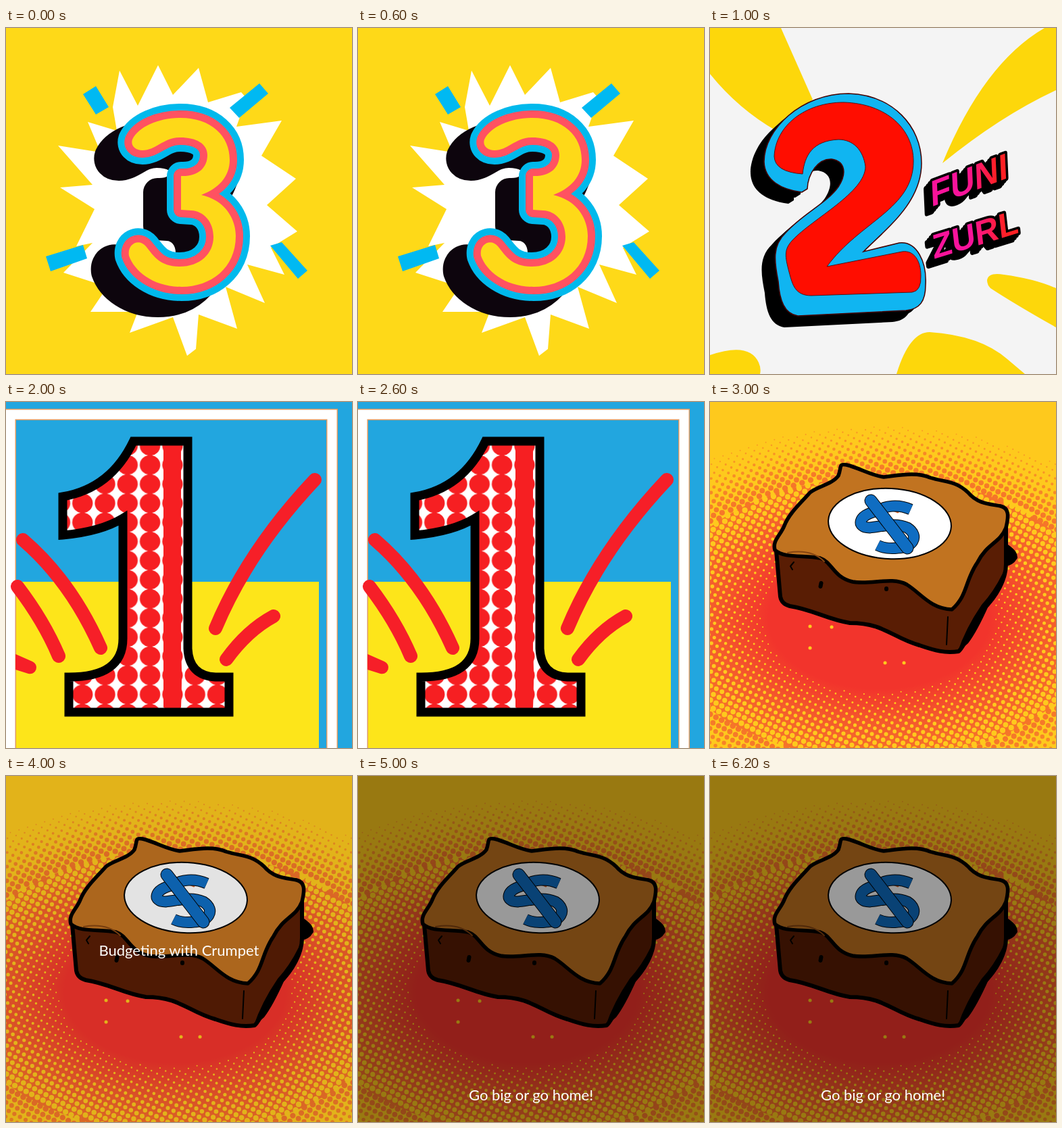
Write an HTML page that moves like this. It is 512 px wide and 512 px high and loops after 7 s.

```html
<!DOCTYPE html>
<html lang="en">
<head>
<meta charset="utf-8">
<title>Countdown</title>
<style>
  html, body { margin: 0; width: 100%; height: 100%; overflow: hidden; }
  svg { display: block; width: 100vw; height: 100vh; }
  .scene { visibility: hidden; }
  .scene.on { visibility: visible; }
  .word { font: 700 49px "Liberation Sans", sans-serif; }
  #caption { font: 400 22px Lato, sans-serif; fill: #fff; text-anchor: middle; }
  .ink { stroke: #000; stroke-linejoin: round; stroke-linecap: round; }
  .line { fill: none; stroke-linecap: round; stroke-linejoin: round; }
</style>
</head>
<body>
<svg viewBox="0 0 512 512">
  <defs>
    <path id="three" d="M187 165C196 146 226 133 258 133C304 133 331 160 331 195C331 220 315 237 289 247
      C324 255 340 282 340 308C340 355 303 383 260 383C218 383 190 360 182 337C179 319 197 311 207 323
      C219 338 228 353 257 353C287 353 307 334 307 309C307 287 293 271 274 270L259 269V219
      C284 220 298 207 298 188C298 171 281 162 258 162C233 162 222 181 202 181C191 181 184 174 187 165Z"/>
    <path id="two" d="M80 198C80 150 135 97 205 97C270 99 313 145 313 200C313 258 262 296 227 331L280 318
      C306 315 321 346 319 380C319 405 310 416 290 418L130 426C110 423 103 403 101 375
      C95 345 92 322 112 303C138 274 172 260 190 235C203 215 200 197 180 194C160 193 145 215 144 238
      L136 243C106 239 81 226 80 198Z"/>
    <g id="words" class="word">
      <text transform="matrix(1 -.38 .05 1.1 327 265)">FUNI</text>
      <text transform="matrix(.97 -.3 .12 1.02 331 342)">ZURL</text>
    </g>
    <linearGradient id="pinkRed">
      <stop offset=".45" stop-color="#f8139b"/><stop offset=".85" stop-color="#ff2024"/>
    </linearGradient>
    <pattern id="dots" width="33.3" height="28.3" x="196.5" y="79" patternUnits="userSpaceOnUse">
      <path fill="#fff" d="M0 0H34V29H0Z"/>
      <ellipse cx="16.6" cy="14.1" rx="15.2" ry="14.400" fill="#f61f22"/>
    </pattern>
    <radialGradient id="heat" gradientUnits="userSpaceOnUse" cx="0" cy="0" r="430"
      gradientTransform="translate(250 320) scale(1 .64)">
      <stop offset=".38" stop-color="#f2342c"/><stop offset=".56" stop-color="#f4592c"/>
      <stop offset=".8" stop-color="#f67a29"/><stop offset="1" stop-color="#f99a24"/>
    </radialGradient>
  </defs>

  <g class="scene">
    <path fill="#fed918" d="M0 0H512V512H0Z"/>
    <path fill="#fff" d="M168 63L195 115L225 55L247 99L285 59L299 110L348 95L356 104L341 146L408 137L378 189
      L429 223L386 262L431 301L392 325L412 365L357 350L383 407L325 383L342 445L285 424L281 475L268 485
      L247 428L183 451L195 420L125 420L150 383L85 362L128 318L104 323L131 268L80 236L128 232L77 174
      L140 184L121 139L164 152L158 117Z"/>
    <path fill="#00b9f2" d="M114 98L133 86L152 117L133 128ZM331 118L375 82L388 97L345 133Z
      M59 338L114 321L120 341L66 360ZM391 322L408 317L446 359L432 371Z"/>
    <g stroke-linejoin="round">
      <use href="#three" x="-35" y="24" fill="#0d050d" stroke="#0d050d" stroke-width="42"/>
      <path fill="#0d050d" d="M349 208L322 247L332 252Q341 238 349 208Z"/>
      <use href="#three" fill="none" stroke="#00b9ec" stroke-width="42"/>
      <use href="#three" fill="#fed918" stroke="#ff5261" stroke-width="22"/>
      <use href="#three" fill="#fed918"/>
    </g>
  </g>

  <g class="scene">
    <path fill="#f4f4f4" d="M0 0H512V512H0Z"/>
    <path fill="#fdd70b" d="M0 0H105L152 106L98 152Q42 120 0 68Z
      M344 200Q405 52 495 0H512V92Q430 130 344 200Z
      M410 373Q412 361 435 365Q480 371 512 385V443Q450 408 415 385Q410 380 410 373Z
      M276 512Q295 450 325 450Q400 455 440 490L466 512Z
      M0 484Q58 464 72 495Q76 504 74 512H0Z"/>
    <use href="#two" x="-20" y="17"/>
    <use href="#two" x="-10" y="8"/>
    <use href="#two" fill="#10b5f1" stroke="#400" stroke-width="1.5"/>
    <path fill="#ff0d00" stroke="#511" d="M137 216Q96 213 95 190C97 145 140 110 198 110C262 112 301 150 301 197
      C301 268 222 286 173 353L284 331C302 328 312 345 312 366Q313 389 299 391L150 396
      C126 396 122 380 117 361C111 338 109 328 122 314C152 282 230 243 230 205
      C227 181 212 165 190 165C152 167 140 188 137 216Z"/>
    <g id="wordShadow" stroke="#000" stroke-width="7" stroke-linejoin="round"></g>
    <use href="#words" fill="url(#pinkRed)"/>
  </g>

  <g class="scene">
    <path fill="#22a6df" d="M0 0H512V512H0Z"/>
    <path fill="#fde51a" d="M14 266H463V512H14Z"/>
    <path fill="none" stroke="#dd9a62" stroke-width="17" d="M6.500 530V18.500M-5 18.500H482.500V530"/>
    <path fill="none" stroke="#fff" stroke-width="14" d="M6.500 530V18.500M-5 18.500H482.500V530"/>
    <path fill="url(#dots)" stroke="#000" stroke-width="13" d="M188.500 58H269V365Q271 405 310 407H330V459H93V407
      Q173 407 173 350V172Q140 192 84 197V140Q155 128 188.500 58Z"/>
    <path fill="#f61f22" d="M233 65H259V370Q261 400 259 452H233Z"/>
    <g class="line" stroke="#f61f28" stroke-width="20">
      <path d="M25 204Q96 265 140 364M17 273Q56 324 78 376M457 115Q358 220 310 335M396 317Q357 338 326 381"/>
    </g>
    <path fill="#f61f28" d="M14 373L39 384A9.500 9.500 0 0 1 33 402L14 396Z"/>
  </g>

  <g class="scene">
    <path fill="#fec91d" d="M0 0H512V512H0Z"/>
    <ellipse cx="250" cy="320" rx="327" ry="209" fill="url(#heat)"/>
    <path id="inkDots" fill="url(#heat)"/>
    <path id="holes" fill="#fec91d"/>
    <path class="line" stroke="#fec91d" stroke-width="5" d="M148 332h.1M180 333h.1M148 364h.1M259 386h.1M287 386h.1"/>
    <g class="ink" stroke-width="6">
      <path d="M440 214Q452 222 452 230Q446 240 436 240Z"/>
      <path fill="#591d04" d="M98 220L104 288Q106 299 118 302C152 307 174 322 207 327C258 327 270 349 310 360
        C333 368 348 372 368 369C382 355 388 325 404 307C424 288 438 262 438 240V182L360 250L200 225Z"/>
      <path stroke="none" d="M366 371Q378 335 402 300Q425 275 440 238Q438 275 412 302Q395 340 382 357Z"/>
      <path fill="#c17320" stroke-width="5.500" d="M96 219C92 205 104 198 110 183C117 165 132 152 148 134
        C158 125 181 122 190 109C195 96 190 91 202 93C222 98 237 108 257 111C282 108 306 103 326 112
        C348 119 363 116 382 134C396 151 415 151 430 154C443 157 442 169 438 186C429 209 410 209 396 237
        C377 264 382 286 358 307C326 306 311 282 291 270C269 258 237 271 211 266C182 259 181 237 163 231
        C140 226 110 232 96 219Z"/>
    </g>
    <path class="line" stroke="#854411" stroke-width="2" d="M115 223Q150 217 169 236"/>
    <path class="line" stroke="#000" stroke-width="2" d="M352 318L350 359M124 237L119 243L122 248"/>
    <path class="line" stroke="#000" stroke-width="6" d="M164.500 268L163.500 273M261 276V277"/>
    <ellipse cx="266" cy="180" rx="91" ry="52" transform="rotate(3 266 180)" fill="#fff" stroke="#000" stroke-width="2"/>
    <path class="line" stroke="#d96a34" stroke-width="3" d="M263 161Q270 158 278 163"/>
    <g id="dollar"></g>
    <path id="shade" d="M0 0H512V512H0Z"/>
    <text id="caption" x="256"></text>
  </g>
</svg>
<script>
const byId = id => document.getElementById(id);
const scenes = [...document.querySelectorAll('.scene')];

// Words get a black extrusion towards the lower left.
byId('wordShadow').innerHTML = [0, 3, 6, 9]
  .map(k => `<use href="#words" x="${-k}" y="${k * 1.2}"/>`).join('');

const S_CURVE = 'M297 159C279 151 259 153 246 162C219 167 216 186 236 186C256 184 274 178 292 186C312 199 298 216 278 216Q260 218 248 212';
const BAR = 'M238 146L292 216';
const stroke = (d, color, width, cap) =>
  `<path d="${d}" fill="none" stroke="${color}" stroke-width="${width}" stroke-linecap="${cap}"/>`;
byId('dollar').innerHTML =
  stroke(S_CURVE, '#000', 17, 'butt') + stroke(S_CURVE, '#0f6dc2', 15, 'butt') +
  stroke(BAR, '#000', 19, 'round') + stroke(BAR, '#0f6dc2', 17, 'round');

// Halftone: ink dots grow inwards, then yellow holes shrink to solid red.
function halftone() {
  const step = 9.4, angle = 0.48, cos = Math.cos(angle), sin = Math.sin(angle);
  const disc = (x, y, r) =>
    `M${(x - r).toFixed(1)} ${y.toFixed(1)}a${r} ${r} 0 1 0 ${2 * r} 0a${r} ${r} 0 1 0 ${-2 * r} 0`;
  let ink = '', holes = '';
  for (let i = -45; i <= 45; i++) for (let j = -45; j <= 45; j++) {
    const x = 256 + step * (i * cos - j * sin), y = 256 + step * (i * sin + j * cos);
    if (x < -6 || x > 518 || y < -6 || y > 518) continue;
    const d = Math.hypot((x - 250) / 430, (y - 320) / 275);
    if (d > 0.76 && d < 1.03) ink += disc(x, y, +(0.9 + (1.03 - d) * 13).toFixed(2));
    else if (d > 0.4 && d <= 0.76) holes += disc(x, y, +(1 + (d - 0.4) * 9).toFixed(2));
  }
  byId('inkDots').setAttribute('d', ink);
  byId('holes').setAttribute('d', holes);
}
halftone();

const captions = [
  { shade: 0, text: '', y: 0 },
  { shade: 0.11, text: 'Budgeting with Crumpet', y: 266 },
  { shade: 0.4, text: 'Go big or go home!', y: 480 }
];
let shown = -1;

function draw() {
  const step = Math.min(5, Math.floor(performance.now() % 7000 / 1000));
  if (step !== shown) {
    shown = step;
    scenes.forEach((scene, i) => scene.classList.toggle('on', i === Math.min(step, 3)));
    const { shade, text, y } = captions[Math.max(0, step - 3)];
    byId('shade').setAttribute('opacity', shade);
    byId('caption').textContent = text;
    byId('caption').setAttribute('y', y);
  }
  requestAnimationFrame(draw);
}
draw();
</script>
</body>
</html>
```
